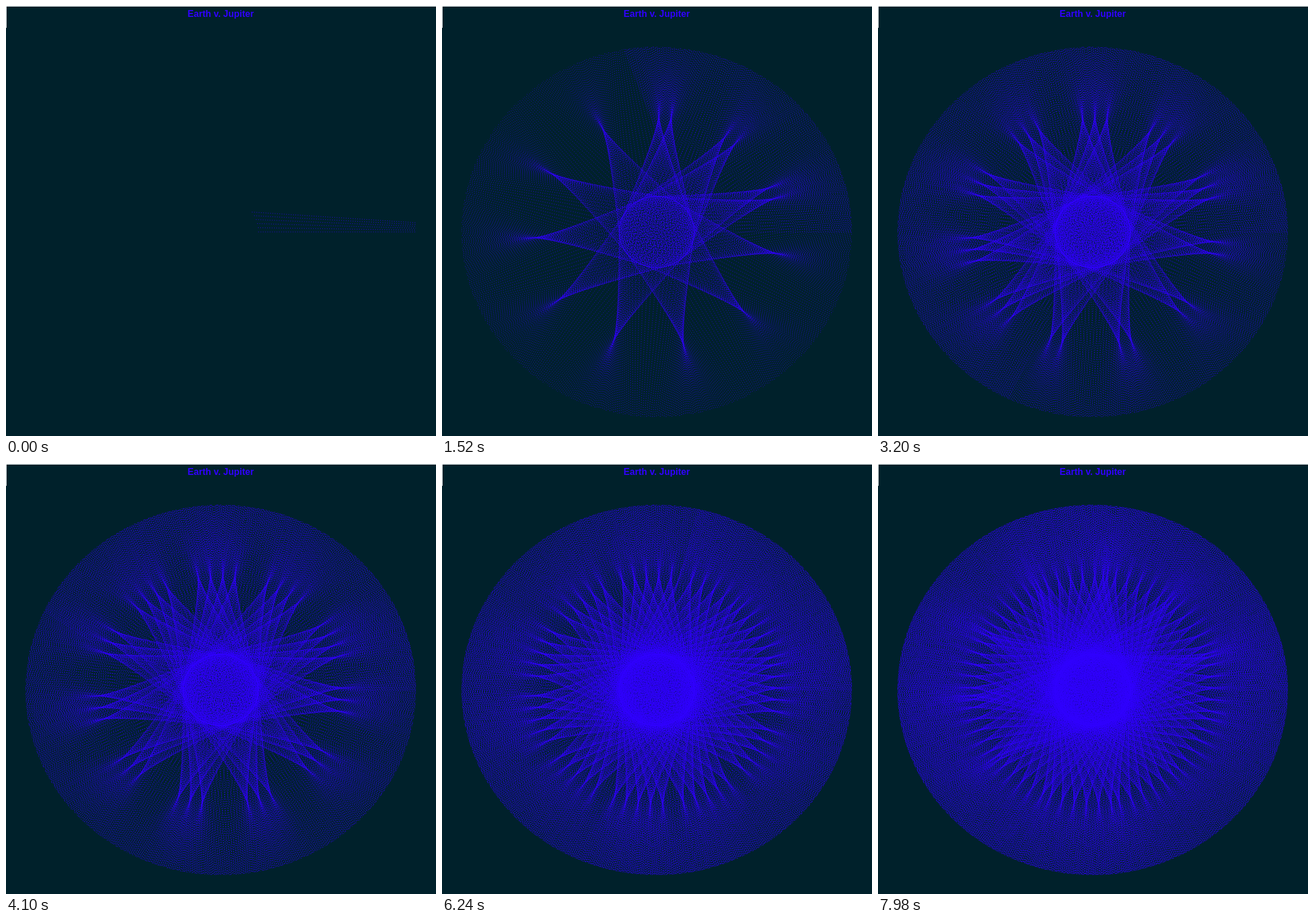
These frames come from a looping animation (749x748 px, 8 s). An HTML page with a canvas:

```html
<!DOCTYPE html>
<html lang="en">
<head>
<meta charset="utf-8">
<title>Earth v. Jupiter</title>
<style>
  html, body { margin: 0; width: 100%; height: 100%; overflow: hidden; background: #00212b; }
  canvas { display: block; }
</style>
</head>
<body>
<canvas id="stage" width="749" height="748"></canvas>
<script>
const ctx = document.getElementById('stage').getContext('2d');

const LOOP = 8000, FRAME = 20;
const LINES_PER_FRAME = 10.49;
const CENTER = { x: 374, y: 393 };
const JUPITER = { rx: 340, ry: 322, step: 0.01 };
const EARTH = { rx: 65.5, ry: 62, step: 0.01 * 11.824 };
const BLUE = '#3000ff';

let drawn = 0;

function position(planet, i) {
  const angle = planet.step * i;
  return [CENTER.x + planet.rx * Math.cos(angle), CENTER.y - planet.ry * Math.sin(angle)];
}

function clearStage() {
  ctx.fillStyle = '#00212b';
  ctx.fillRect(0, 0, 749, 748);
  ctx.fillStyle = '#fff';
  ctx.fillRect(0, 0, 749, 1);
  ctx.fillRect(0, 0, 1, 38);
  ctx.fillStyle = BLUE;
  ctx.font = 'bold 16px "Liberation Sans", Arial, sans-serif';
  ctx.textAlign = 'center';
  ctx.fillText('Earth v. Jupiter', 374, 19);
  ctx.strokeStyle = BLUE;
  ctx.lineWidth = 1;
  ctx.setLineDash([1, 3]);
  drawn = 0;
}

// Each line is stroked separately so that overlapping dots build up.
function drawLine(i) {
  ctx.beginPath();
  ctx.moveTo(...position(EARTH, i));
  ctx.lineTo(...position(JUPITER, i));
  ctx.stroke();
}

const start = performance.now();

function render() {
  const frame = Math.floor((performance.now() - start) % LOOP / FRAME);
  const count = Math.round(4.6 + LINES_PER_FRAME * frame) + 1;
  if (count < drawn) clearStage();
  while (drawn < count) drawLine(drawn++);
  requestAnimationFrame(render);
}

clearStage();
render();
</script>
</body>
</html>
```
